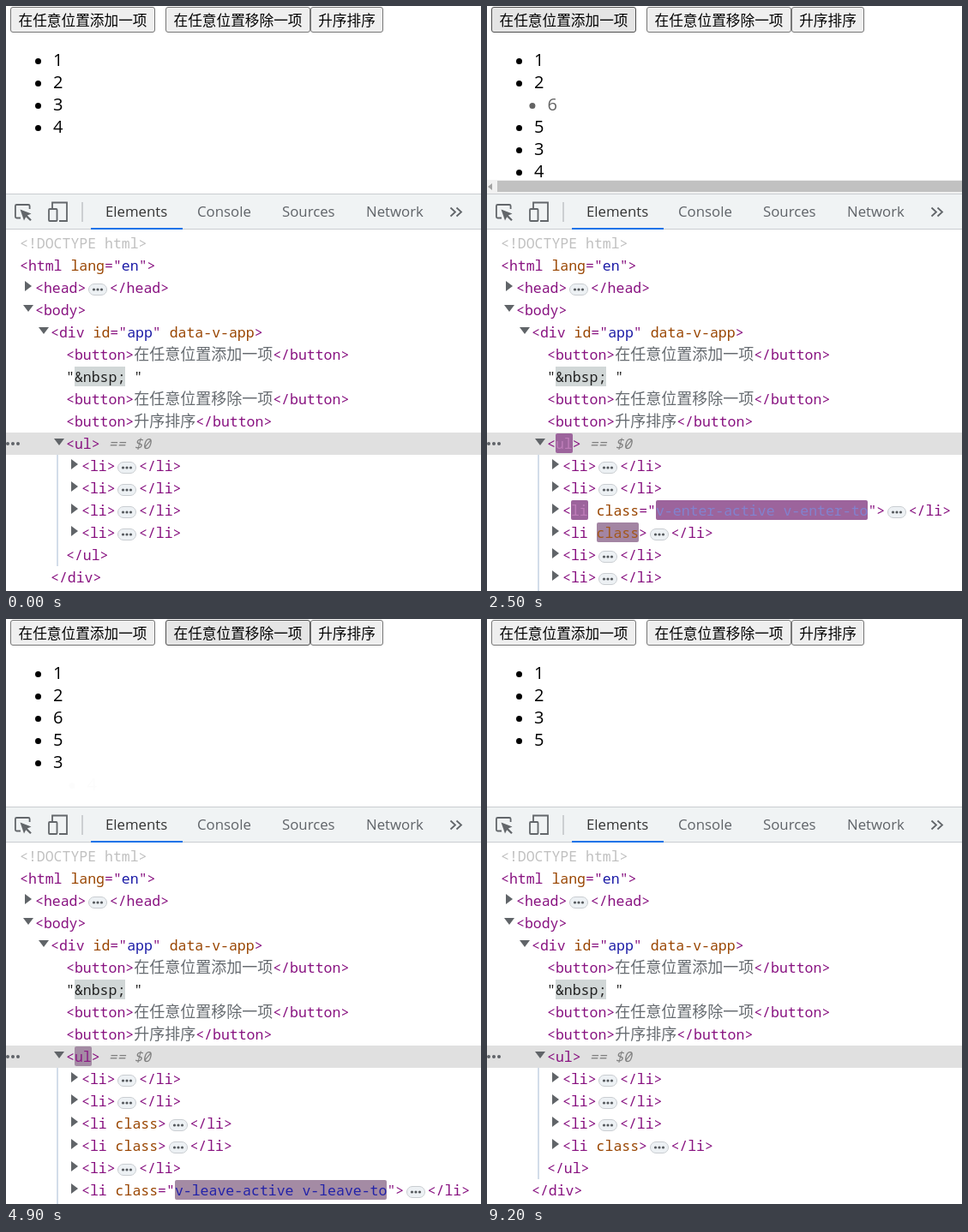
Write an HTML page that moves like this. It is 554 px wide and 683 px high and loops after 9.8 s.

```html
<!DOCTYPE html>
<html lang="zh">
<head>
<meta charset="utf-8">
<title>List transition</title>
<style>
html, body { margin: 0; width: 100%; height: 100%; overflow: hidden; background: #fff; }
#stage { position: relative; width: 554px; height: 683px; overflow: hidden; background: #fff; }
#stage div, #stage > svg { position: absolute; box-sizing: border-box; white-space: pre; }
.btn { top: 1px; height: 30px; border: 1px solid #767676; border-radius: 3px; background: #efefef;
  font: 16.67px/28px "Noto Sans CJK SC", "Noto Sans CJK", sans-serif; text-align: center; color: #000; }
.btn.hover { background: #e5e5e5; border-color: #4f4f4f; }
.btn.press { background: #f5f5f5; border-color: #8d8d8d; }
.item { left: 0; width: 110px; height: 26px; padding-left: 55px; font: 20px/26px "Open Sans", "Noto Sans", sans-serif; color: #000; }
.item::before { content: ""; position: absolute; left: 34px; top: 11px; width: 7px; height: 7px; border-radius: 50%; background: #000; }
#scroll { left: 0; top: 203px; width: 554px; height: 16px; background: #f1f1f1; }
#scroll::before { content: ""; position: absolute; left: 1px; top: 4px; border: solid transparent; border-width: 4px 5px 4px 0; border-right-color: #a3a3a3; }
#thumb { left: 12px; top: 1px; width: 542px; height: 13px; background: #c1c1c1; }
#tools { left: 0; top: 219px; width: 554px; height: 464px; background: #fff; }
#bar { left: 0; top: 0; width: 554px; height: 42px; background: #f0f3f4; border: solid #cacdd1; border-width: 1px 0; }
.tab { top: 8px; font: 16.8px/26px "Open Sans", "Noto Sans", sans-serif; color: #5f6368; }
.tab.on { color: #333; }
#line { left: 99px; top: 40px; width: 107px; height: 2px; background: #1a73e8; }
.row { height: 26px; font: 16.5px/26px "Noto Sans Mono", "DejaVu Sans Mono", monospace; color: #222; }
.row svg { vertical-align: middle; margin: 0 2.7px; }
.arrow { width: 0; height: 0; border: 6px solid transparent; }
.arrow.right { border-width: 6px 0 6px 8px; border-left-color: #606468; }
.arrow.down { border-width: 8px 6px 0; border-top-color: #606468; }
.tag { color: #881280; }
.name { color: #994500; }
.value { color: #1a1aa6; }
.cjk { font: 300 18px/0 "Noto Sans CJK SC", "Noto Sans CJK", sans-serif; color: #666b70; }
.type { color: #c0c0c0; }
.nbsp { background: #d1d7d7; }
.note { color: #808080; font-style: italic; }
.flash { border-radius: 2px; }
#picked { left: 0; top: 498px; width: 554px; height: 26px; background: #e0e0e0; }
#guide { left: 59px; top: 524px; width: 2px; background: #d3dde9; }
</style>
</head>
<body>
<div id="stage">
  <div class="btn" style="left:5px;width:169px">在任意位置添加一项</div>
  <div class="btn" style="left:186px;width:169px">在任意位置移除一项</div>
  <div class="btn" style="left:355px;width:85px">升序排序</div>
  <div id="list"></div>
  <div id="scroll"><div id="thumb"></div></div>
  <div id="tools">
    <div id="bar"></div>
    <div class="tab on" style="left:116px">Elements</div>
    <div class="tab" style="left:223px">Console</div>
    <div class="tab" style="left:322px">Sources</div>
    <div class="tab" style="left:420px">Network</div>
    <div id="line"></div>
  </div>
  <svg width="554" height="683" style="left:0;top:0" fill="none" stroke="#62666a" stroke-width="1.8">
    <path d="M17 247.500H12.500Q10.900 247.500 10.900 246V233.500Q10.900 232 12.500 232H26Q27.600 232 27.600 233.500V237"/>
    <path d="M16.500 237.500L29.500 242.500L24.800 244.600L29.800 249.400L28.200 251L23.200 246.200L21 250.500Z" fill="#62666a" stroke="none"/>
    <path d="M54 236V229.500H71V251H62"/>
    <rect x="50" y="237" width="9.500" height="14" rx="1"/>
    <path d="M89 229V252" stroke="#c8cbce"/>
    <path d="M518.500 235.500L524 240.500L518.500 245.500M525.500 235.500L531 240.500L525.500 245.500"/>
  </svg>
  <div id="picked"></div>
  <svg width="18" height="8" style="left:0;top:507px" fill="#5f6368"><circle cx="2" cy="4" r="2"/><circle cx="8" cy="4" r="2"/><circle cx="14" cy="4" r="2"/></svg>
  <div id="guide"></div>
  <div id="fixed"></div>
  <div id="tree"></div>
</div>
<script>
const LOOP = 9800;
// Each step: time, items (+ entering, - leaving, = empty class), whether the ul flashes.
const steps = [
  [0, '1 2 3 4', false],
  [800, '1 2 5+ 3 4', true],
  [1800, '1 2 5= 3 4', false],
  [2145, '1 2 6+ 5= 3 4', true],
  [3145, '1 2 6= 5= 3 4', false],
  [4050, '1 2 6= 5= 3 4-', true],
  [5050, '1 2 6= 5= 3', true],
  [5750, '1 2 6- 5= 3', true],
  [6750, '1 2 5= 3', true],
  [7600, '1 2 3 5=', true]
].map(([at, items, ul]) => ({ at, items: items.split(' '), ul }));
const hovers = [[200, 3600], [4000, 7200], [7200, 9200]];
const clicks = [[800, 2145], [4050, 5750], [7600]];

const $ = id => document.getElementById(id);
const buttons = [...document.querySelectorAll('.btn')];
const span = (cls, text) => `<span class="${cls}">${text}</span>`;
const hot = (text, since) => since == null ? text : `<span class="flash" data-since="${since}">${text}</span>`;
const attr = (name, value) => ' ' + span('name', name) + (value == null ? '' : '="' + span('value', value) + '"');
const open = (name, attrs = '') => span('tag', `&lt;${name}${attrs}&gt;`);
const close = name => span('tag', `&lt;/${name}&gt;`);
const pill = '<svg width="22" height="14"><rect x=".5" y=".5" width="21" height="13" rx="6.500" fill="#edf1f4" stroke="#c9cdd1"/>' +
  [6.5, 11, 15.5].map(x => `<circle cx="${x}" cy="7" r="1.600" fill="#55595d"/>`).join('') + '</svg>';

// Row n is counted from the doctype line; depth is an indent of 18 px.
function row(n, depth, html, arrow) {
  const x = 16 + depth * 18, y = 264 + n * 26;
  const mark = arrow === 'right' ? [x - 12, y + 5] : [x - 14, y + 7];
  return `<div class="row" style="left:${x}px;top:${y}px">${html}</div>` +
    (arrow ? `<div class="arrow ${arrow}" style="left:${mark[0]}px;top:${mark[1]}px"></div>` : '');
}

const button = text => open('button') + span('cjk', text) + close('button');
$('fixed').innerHTML = [
  row(0, 0, span('type', '&lt;!DOCTYPE html&gt;')),
  row(1, 0, open('html', attr('lang', 'en'))),
  row(2, 1, open('head') + pill + close('head'), 'right'),
  row(3, 1, open('body'), 'down'),
  row(4, 2, open('div', attr('id', 'app') + attr('data-v-app')), 'down'),
  row(5, 3, button('在任意位置添加一项')),
  row(6, 3, `"${span('nbsp', '&amp;nbsp;')} "`),
  row(7, 3, button('在任意位置移除一项')),
  row(8, 3, button('升序排序'))
].join('');

// Time at which an item took on its present form.
function since(item, i) {
  while (i > 0 && steps[i - 1].items.includes(item)) i--;
  return steps[i].at;
}

function node(item, i) {
  const kind = item[1], at = since(item, i);
  const moved = i === steps.length - 1 && item === '3';
  const name = hot('li', kind === '+' ? at : moved ? steps[i].at : null);
  const phase = kind === '+' ? 'enter' : 'leave';
  const attrs = !kind ? '' : kind === '='
    ? attr(hot('class', at))
    : attr('class', hot(`v-${phase}-active v-${phase}-to`, at));
  return open(name, attrs) + pill + close('li');
}

const flashFrames = [
  { backgroundColor: 'rgb(146,50,146)', color: '#fff', easing: 'ease' },
  { offset: 0.8, backgroundColor: 'rgb(165,142,165)', color: 'inherit', easing: 'ease' },
  { backgroundColor: 'rgba(165,142,165,0)', color: 'inherit' }
];
const away = { opacity: 0, transform: 'translateX(40px)' };
const home = { opacity: 1, transform: 'none' };

let current = -1, running = [];

function run(el, start, frames, timing) {
  const anim = el.animate(frames, timing);
  anim.pause();
  running.push({ anim, start });
}

function build(i) {
  running.forEach(r => r.anim.cancel());
  running = [];
  const { items } = steps[i], n = items.length;
  const ulStep = steps.slice(0, i + 1).reverse().find(s => s.ul);

  $('list').innerHTML = items.map((item, k) =>
    `<div class="item" style="top:${50 + k * 26}px">${item[0]}</div>`).join('');
  $('tree').innerHTML =
    row(9, 3, open(hot('ul', ulStep && ulStep.at)) + span('note', ' == $0'), 'down') +
    items.map((item, k) => row(10 + k, 4, node(item, i), 'right')).join('') +
    row(10 + n, 3, close('ul')) + row(11 + n, 2, close('div'));
  $('guide').style.height = 26 * (n + 1) + 'px';
  $('scroll').style.display = items.some(s => s[1] === '+') ? '' : 'none';

  items.forEach((item, k) => {
    const kind = item[1];
    if (kind !== '+' && kind !== '-') return;
    run($('list').children[k], steps[i].at, kind === '+' ? [away, home] : [home, away],
      { duration: 1000, easing: 'ease', fill: 'both' });
  });
  document.querySelectorAll('.flash').forEach(el =>
    run(el, +el.dataset.since, flashFrames, { duration: 1400 }));
  current = i;
}

function draw(t) {
  let i = steps.length - 1;
  while (steps[i].at > t) i--;
  if (i !== current) build(i);
  running.forEach(r => { r.anim.currentTime = t - r.start; });
  buttons.forEach((b, k) => {
    const [from, to] = hovers[k];
    b.classList.toggle('hover', t >= from && t < to);
    b.classList.toggle('press', clicks[k].some(c => t >= c - 60 && t < c + 40));
  });
}

const begin = performance.now();
function tick() {
  draw((performance.now() - begin) % LOOP);
  requestAnimationFrame(tick);
}
tick();
</script>
</body>
</html>
```
